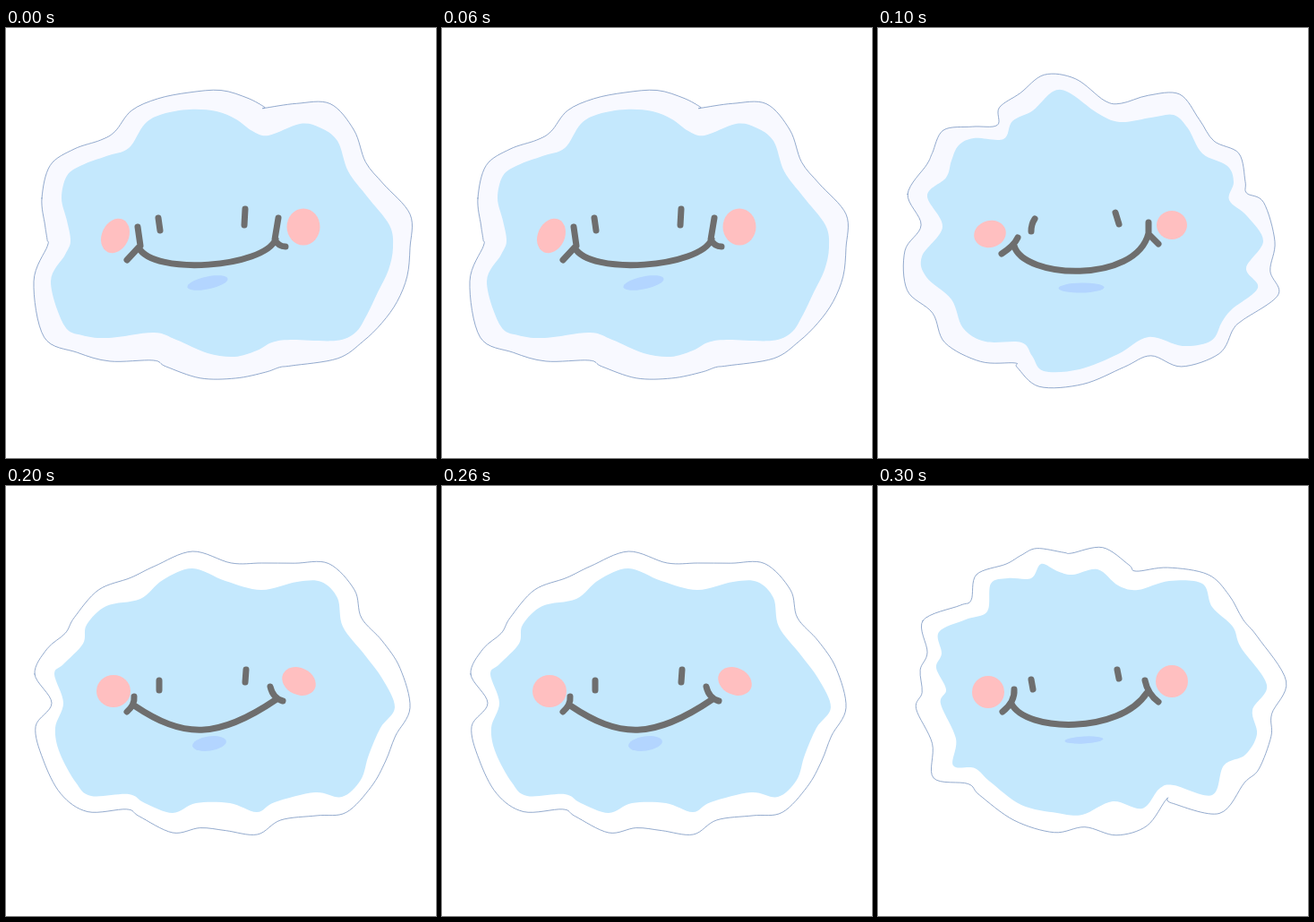
These frames come from a looping animation (480 px wide and 480 px high, 0.4 s). An HTML page with a canvas:

```html
<!DOCTYPE html>
<html lang="en">
<head>
<meta charset="utf-8">
<title>Wobbly cloud</title>
<style>
html, body { margin: 0; width: 100%; height: 100%; overflow: hidden; background: #fff; }
canvas { display: block; }
</style>
</head>
<body>
<canvas id="stage" width="480" height="480"></canvas>
<script>
const ctx = document.getElementById('stage').getContext('2d');
const POSE_MS = 100;
const poses = [];

// Closed Catmull-Rom curve through the points.
function smooth(points) {
  const at = i => points[(i + points.length) % points.length];
  const path = new Path2D();
  path.moveTo(...at(0));
  points.forEach(([x, y], i) => {
    const before = at(i - 1), next = at(i + 1), after = at(i + 2);
    path.bezierCurveTo(
      x + (next[0] - before[0]) / 6, y + (next[1] - before[1]) / 6,
      next[0] - (after[0] - x) / 6, next[1] - (after[1] - y) / 6,
      next[0], next[1]);
  });
  path.closePath();
  return path;
}

// Pushes each clockwise point [x, y, gap] outwards by its gap.
function widen(points) {
  return points.map(([x, y, gap], i) => {
    const before = points.at(i - 1), after = points[(i + 1) % points.length];
    const dx = after[0] - before[0], dy = after[1] - before[1];
    const scale = gap / Math.hypot(dx, dy);
    return [x + dy * scale, y - dx * scale];
  });
}

function oval(x, y, rx, ry, degrees = 0) {
  const path = new Path2D();
  path.ellipse(x, y, rx, ry, degrees * Math.PI / 180, 0, 2 * Math.PI);
  return path;
}

// The outline lists "x,y,gap", where gap is the width of the rim at that point.
function addPose(rimColor, outline, face, leftCheek, rightCheek, chin) {
  const points = outline.trim().split(/\s+/).map(item => item.split(',').map(Number));
  poses.push({
    rimColor, leftCheek, rightCheek, chin,
    body: smooth(points),
    rim: smooth(widen(points)),
    face: new Path2D(face)
  });
}

addPose('#f8f9ff',
  `62,190,22 68,165,22 85,153,20 112,143,19 137,134,24 155,107,21 175,96,18 205,91,19 235,93,24
  257,102,27 275,115,30 293,120,31 328,107,23 350,111,29 370,126,22 382,160,22 403,188,23
  428,220,26 432,245,19 427,270,22 415,295,24 403,320,19 390,340,13 368,349,20 318,348,29
  297,351,29 280,360,26 255,367,24 225,363,29 190,348,32 165,340,31 115,346,26 85,343,20
  65,332,26 50,283,19 66,253,22 72,238,26 68,215,25`,
  `M170 212L172 226M267 202L266 220M147 222L150 243M135 259L148 245
  C165 277 288 267 301 236M304 212L300 236Q304 244 312 244`,
  oval(122, 232, 15, 20, 25), oval(332, 222, 18.5, 20.5), oval(225, 284.5, 23, 7, -12));

addPose('#f8f9ff',
  `55,187,22 76,167,26 82,148,23 90,131,24 107,123,13 140,124,17 150,104,21 173,92,24 195,71,21
  213,72,17 245,95,16 270,105,21 305,100,25 330,97,24 346,112,16 362,140,19 390,154,19 397,172,13
  392,192,21 412,210,24 430,238,13 411,268,27 424,290,24 395,314,17 384,328,15 372,349,17
  340,355,23 302,345,21 268,364,16 225,381,17 185,383,18 172,366,21 160,351,24 120,350,23
  95,335,26 82,303,26 54,278,26 49,255,20 72,222,24`,
  `M175 213Q171 219 171 227M265 206L269 219M156 234Q152 243 138 252M152 243
  C162 280 288 286 302 229M302 217V230L313 241`,
  oval(125, 230, 18, 15, -15), oval(328, 220, 17, 16), oval(227, 290, 25.5, 5.5, -1));

addPose('#fff',
  `54,210,22 64,199,25 86,176,23 90,155,16 112,134,20 150,126,26 175,105,18 208,92,19 245,106,21
  285,116,30 325,107,21 352,107,22 370,125,21 376,157,23 400,188,25 420,215,23 434,247,17
  418,270,19 405,300,20 396,328,14 375,347,18 345,342,26 300,353,21 280,364,25 250,354,31
  212,354,28 186,365,22 155,354,16 137,344,17 95,346,18 78,331,21 60,298,20 55,270,22 64,242,13`,
  `M171 217V228M268 205L267 219M143 235Q144 244 135 252M143 245
  C198 282 236 283 302 238M295 224Q298 237 309 240`,
  oval(120, 229, 19, 18), oval(327, 218, 19.5, 15, 25), oval(227, 287.5, 19, 8, -8));

addPose('#fff',
  `68,163,22 98,149,17 122,140,22 126,109,19 145,103,16 171,103,28 182,87,18 200,95,22 217,99,24
  245,93,25 268,111,26 290,116,21 325,106,15 362,109,12 373,135,23 396,157,14 405,180,22
  434,222,22 418,250,22 423,277,16 410,300,22 386,312,30 373,345,22 330,334,20 314,338,14
  295,360,20 262,352,38 228,367,14 200,365,22 160,356,19 125,330,19 108,315,19 84,312,26
  87,282,27 70,243,28 76,227,27 65,203,18 71,187,16`,
  `M171 216L173 227M267 205L269 215M152 227Q153 241 139 252M149 243
  C165 275 270 277 300 231M298 217Q301 232 313 241`,
  oval(123, 230, 18, 18), oval(328, 218, 18, 18), oval(230, 283.5, 21.5, 4, -3));

function fill(path, color) {
  ctx.fillStyle = color;
  ctx.fill(path);
}

function stroke(path, color, width) {
  ctx.strokeStyle = color;
  ctx.lineWidth = width;
  ctx.stroke(path);
}

function draw() {
  const pose = poses[Math.floor(performance.now() / POSE_MS) % poses.length];
  ctx.clearRect(0, 0, 480, 480);
  fill(pose.rim, pose.rimColor);
  stroke(pose.rim, '#7895c0', 0.8);
  fill(pose.body, '#c4e8fd');
  fill(pose.leftCheek, '#ffbfc0');
  fill(pose.rightCheek, '#ffbfc0');
  fill(pose.chin, '#b3d5ff');
  stroke(pose.face, '#6e6e6e', 7);
  requestAnimationFrame(draw);
}

ctx.lineCap = ctx.lineJoin = 'round';
draw();
</script>
</body>
</html>
```
